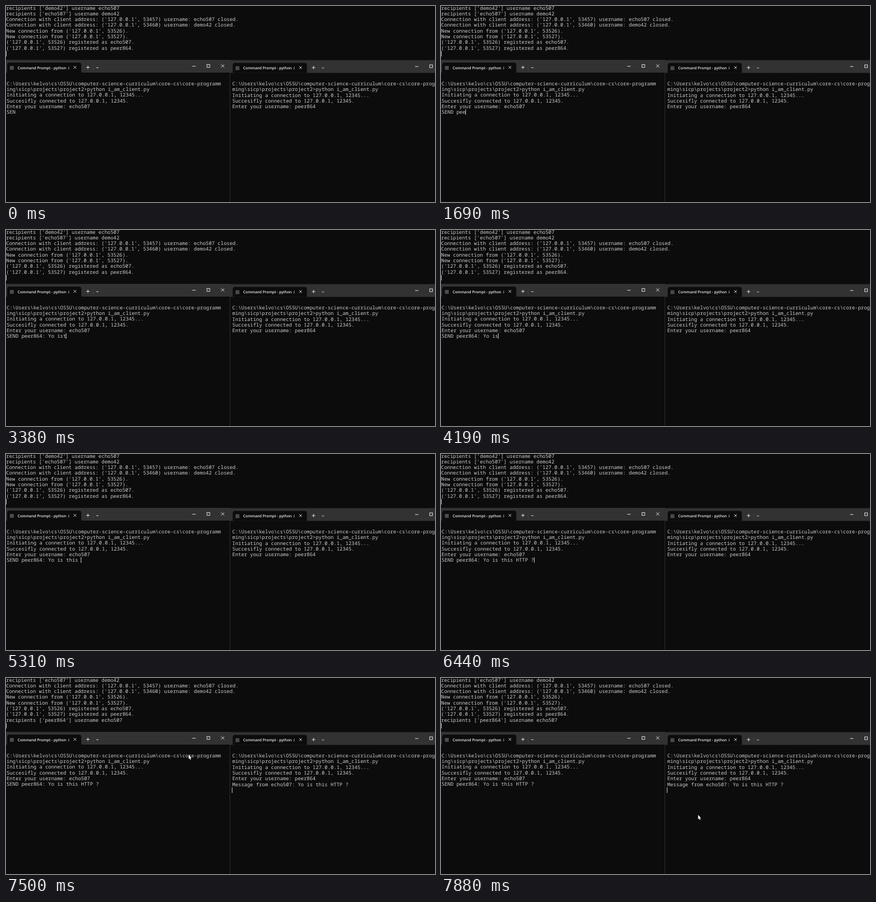
Write an HTML page with a canvas that moves like this. It is 775 px wide and 353 px high and loops after 8 s.

```html
<!DOCTYPE html>
<html lang="en">
<head>
<meta charset="utf-8">
<title>Chat between two terminals</title>
<style>
  html, body { margin: 0; width: 100%; height: 100%; overflow: hidden; background: #0c0c0c; }
  canvas { display: block; }
</style>
</head>
<body>
<canvas id="stage" width="775" height="353"></canvas>
<script>
const ctx = document.getElementById('stage').getContext('2d');
const LOOP = 8000;
const MONO = '8.98px "Noto Sans Mono", monospace';
const TITLE = '600 6.7px "Open Sans", sans-serif';
const ADVANCE = 5.39, PITCH = 10.28;
const BG = '#0c0c0c', BAR = '#323232', INK = '#cccccc', WHITE = '#f2f2f2';

const SENDER = 'echo507', RECEIVER = 'peer864', OLD = 'demo42';
const MESSAGE = 'Yo is this HTTP ?';
const COMMAND = `SEND ${RECEIVER}: ${MESSAGE}`;
const PATH = String.raw`C:\Users\kelvo\cs\OSSU\computer-science-curriculum\core-cs\core-programming\sicp\projects\project2>python i_am_client.py`;
const SENT = 6750, RECEIVED = 6810;

// [time, characters of the command, mistyped characters after them]
const TYPING = [
  [0, 3], [60, 4], [1000, 5], [1500, 6], [1690, 8], [1810, 9],
  [2000, 10], [2120, 11], [2190, 12], [2440, 13], [2750, 15],
  [3000, 16], [3060, 17], [3190, 18], [3250, 19], [3310, 19, 't'], [3440, 19, 'th'],
  [3750, 19, 't'], [4190, 19], [4250, 20],
  [4440, 21], [4560, 22], [4690, 24], [4810, 25], [4940, 25, 'h'], [5310, 25],
  [5750, 26], [5880, 27], [5940, 28], [6060, 29], [6250, 30], [6440, 31]
];

const serverLog = [
  `recipients ['${OLD}'] username ${SENDER}`,
  `recipients ['${SENDER}'] username ${OLD}`,
  `Connection with client address: ('127.0.0.1', 53457) username: ${SENDER} closed.`,
  `Connection with client address: ('127.0.0.1', 53460) username: ${OLD} closed.`,
  "New connection from ('127.0.0.1', 53526).",
  "New connection from ('127.0.0.1', 53527).",
  `('127.0.0.1', 53526) registered as ${SENDER}.`,
  `('127.0.0.1', 53527) registered as ${RECEIVER}.`,
  `recipients ['${RECEIVER}'] username ${SENDER}`
];

const session = (wrap, user) => [
  PATH.slice(0, wrap),
  PATH.slice(wrap),
  'Initiating a connection to 127.0.0.1, 12345...',
  'Succesifly connected to 127.0.0.1, 12345.',
  `Enter your username: ${user}`
];

function rect(x, y, w, h, color) {
  ctx.fillStyle = color;
  ctx.fillRect(x, y, w, h);
}

function text(str, x, y, font, color) {
  ctx.font = font;
  ctx.fillStyle = color;
  ctx.fillText(str, x, y);
}

function strokePath(color, ...lines) {
  ctx.beginPath();
  for (const points of lines) {
    points.forEach(([x, y], i) => i ? ctx.lineTo(x, y) : ctx.moveTo(x, y));
  }
  ctx.strokeStyle = color;
  ctx.lineWidth = 0.9;
  ctx.stroke();
}

function cross(x, y, r) {
  strokePath(WHITE, [[x - r, y - r], [x + r, y + r]], [[x + r, y - r], [x - r, y + r]]);
}

function terminal(lines, x, baseline) {
  lines.forEach((line, row) => text(line, x, baseline + row * PITCH, MONO, INK));
}

function caret(x, baseline, col, row, alpha = 1) {
  ctx.globalAlpha = alpha;
  rect(Math.floor(x + col * ADVANCE), Math.round(baseline + row * PITCH - 8), 1, 10, INK);
  ctx.globalAlpha = 1;
}

function titleBar(x, y, width) {
  rect(x, y, width, 23, BAR);
  ctx.fillStyle = BG;
  ctx.beginPath();
  ctx.roundRect(x + 2, y + 5, 134, 18, [4, 4, 0, 0]);
  ctx.fill();
  const mid = y + 14;
  rect(x + 7, mid - 3, 7, 7, '#4a4a4a');
  text('Command Prompt - python  i', x + 21, mid + 2.5, TITLE, WHITE);
  cross(x + 124.5, mid - 0.5, 2.3);
  strokePath(WHITE, [[x + 145, mid - 0.5], [x + 151, mid - 0.5]], [[x + 148, mid - 3.5], [x + 148, mid + 2.5]]);
  rect(x + 157, mid - 5, 1, 10, '#3e3e3e');
  strokePath(WHITE, [[x + 163, mid - 1], [x + 165, mid + 1], [x + 167, mid - 1]]);
}

function windowButtons(x, y) {
  strokePath(WHITE, [[x - 3, y + 0.5], [x + 3, y + 0.5]]);
  ctx.strokeRect(x + 23.5, y - 2.5, 5, 5);
  cross(x + 52, y, 2.7);
}

function pointer(x, y) {
  const shape = [[0, 0], [0, 8], [1.8, 6.5], [3, 9.2], [4.3, 8.6], [3.1, 6], [5.3, 5.8]];
  ctx.beginPath();
  shape.forEach(([dx, dy]) => ctx.lineTo(x + dx, y + dy));
  ctx.closePath();
  ctx.strokeStyle = '#000';
  ctx.lineWidth = 1;
  ctx.stroke();
  ctx.fillStyle = '#fff';
  ctx.fill();
}

// The caret fades out in three steps.
const fade = (t, start) => Math.max(0, 1 - (Math.floor((t - start) / 60) + 1) / 3);

function caretAlpha(t) {
  if (t < 60) return 0;
  if (t < 690) return 1;
  if (t < 1310) return fade(t, 690);
  if (t < 7380) return 1;
  return fade(t, 7380);
}

function drawPointer(t) {
  if (t < 7440) return;
  const step = Math.floor((Math.min(t, 7880) - 7440) / 62.8) / 7;
  const p = Math.min(1, step), q = 1 - p;
  const bezier = (a, b, c) => q * q * a + 2 * q * p * b + p * p * c;
  pointer(bezier(330, 390, 464.5), bezier(138, 350, 246.5));
}

function draw(t) {
  rect(0, 0, 775, 353, BG);

  const scrolled = t >= SENT ? 1 : 0;
  terminal(serverLog.slice(scrolled, scrolled + 8), 0.3, 6.6);
  caret(0.3, 6.6, 0, 8);

  titleBar(0, 97, 405);
  windowButtons(339.5, 108);
  titleBar(407.6, 97.5, 367.4);
  rect(405, 97.5, 3, 23, BAR);
  windowButtons(742, 108.5);
  rect(404, 120, 1, 233, '#2c2c2c');

  const left = [1, 142.8], right = [408.8, 143.2];
  const [, count, typo = ''] = TYPING.findLast(([time]) => time <= t);
  const typed = COMMAND.slice(0, count) + typo;
  terminal([...session(72, SENDER), typed], ...left);
  if (scrolled) caret(...left, 0, 6, caretAlpha(t));
  else caret(...left, typed.length, 5, caretAlpha(t));

  const inbox = session(71, RECEIVER);
  if (t >= RECEIVED) {
    inbox.push(`Message from ${SENDER}: ${MESSAGE}`);
    caret(...right, 0, 6);
  }
  terminal(inbox, ...right);

  drawPointer(t);
}

ctx.textRendering = 'geometricPrecision';
const start = performance.now();
function tick() {
  draw((performance.now() - start) % LOOP);
  requestAnimationFrame(tick);
}
tick();
</script>
</body>
</html>
```
